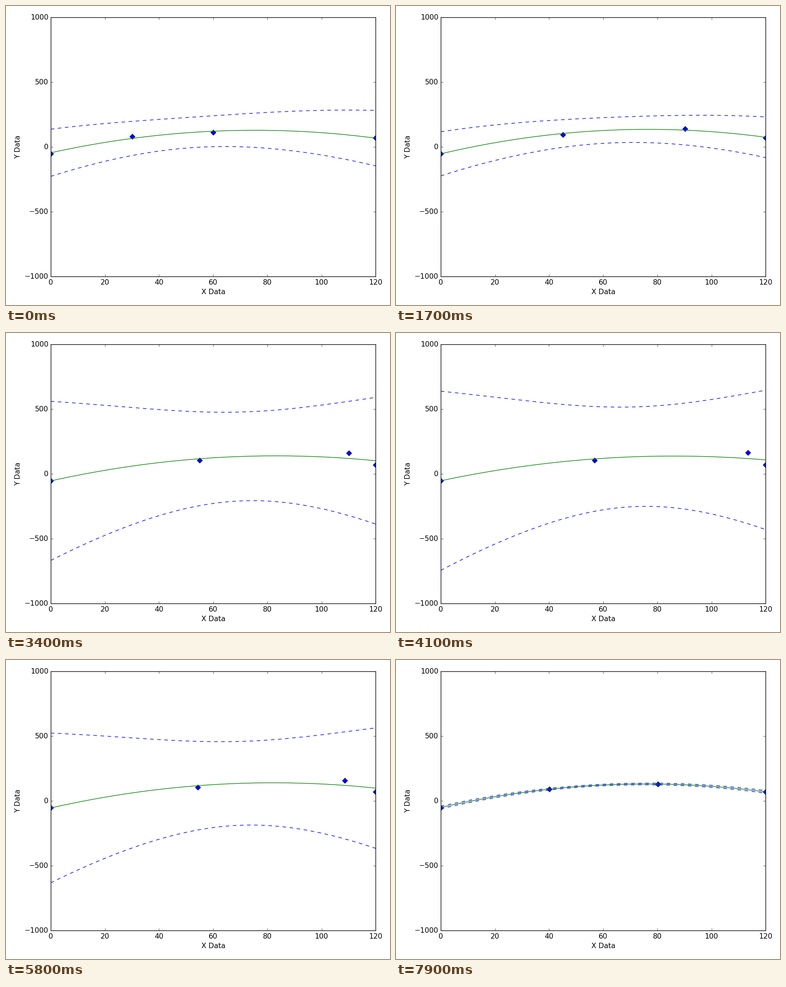
Animation, 849 px wide and 660 px high, one loop 8 s. Source, as a matplotlib script:

```python
import numpy as np
import matplotlib.pyplot as plt
from matplotlib.animation import FuncAnimation

W, H = 849, 660
DPI = W / 9
FRAMES, INTERVAL = 80, 100
T_CRIT = 12.7062  # two-sided 95 % Student t, one degree of freedom

plt.style.use("classic")
plt.rcParams.update({"font.family": "DejaVu Sans", "font.size": 12})

fig = plt.figure(figsize=(W / DPI, H / DPI), dpi=DPI, facecolor="white")
left, right, top, bottom = 99, 817.2, 25, 597.4
ax = fig.add_axes([left / W, 1 - bottom / H, (right - left) / W, (bottom - top) / H])
ax.set(xlim=(0, 120), ylim=(-1000, 1000), xlabel="X Data", ylabel="Y Data")
ax.set_yticks(range(-1000, 1001, 500))

grid = np.linspace(0, 120, 241)
points, = ax.plot([], [], "bD")
curve, = ax.plot([], [], "g-")
upper, = ax.plot([], [], "b--")
lower, = ax.plot([], [], "b--")


def sample(i):
    """Four points; the middle two swing along diagonals."""
    swing = 27 * np.sin(np.radians(2 * i))
    x = np.array([0, 30 + swing, 60 + 2 * swing, 120])
    y = np.array([-50, 80 + swing, 111 + 2 * swing, 70])
    return x, y


def confidence(x, y, coef):
    """Half width of the confidence band over the grid."""
    n = len(x)
    resid = y - np.polyval(coef, x)
    s = np.sqrt(np.sum(resid**2) / (n - len(coef)))
    spread = np.sum((x - x.mean()) ** 2)
    return T_CRIT * s * np.sqrt(1 / n + (grid - x.mean()) ** 2 / spread)


def update(i):
    x, y = sample(i)
    coef = np.polyfit(x, y, 2)
    fit = np.polyval(coef, grid)
    half = confidence(x, y, coef)
    points.set_data(x, y)
    curve.set_data(grid, fit)
    upper.set_data(grid, fit + half)
    lower.set_data(grid, fit - half)
    return points, curve, upper, lower


anim = FuncAnimation(fig, update, frames=FRAMES, interval=INTERVAL,
                     repeat=True, repeat_delay=0)
plt.show()
```
